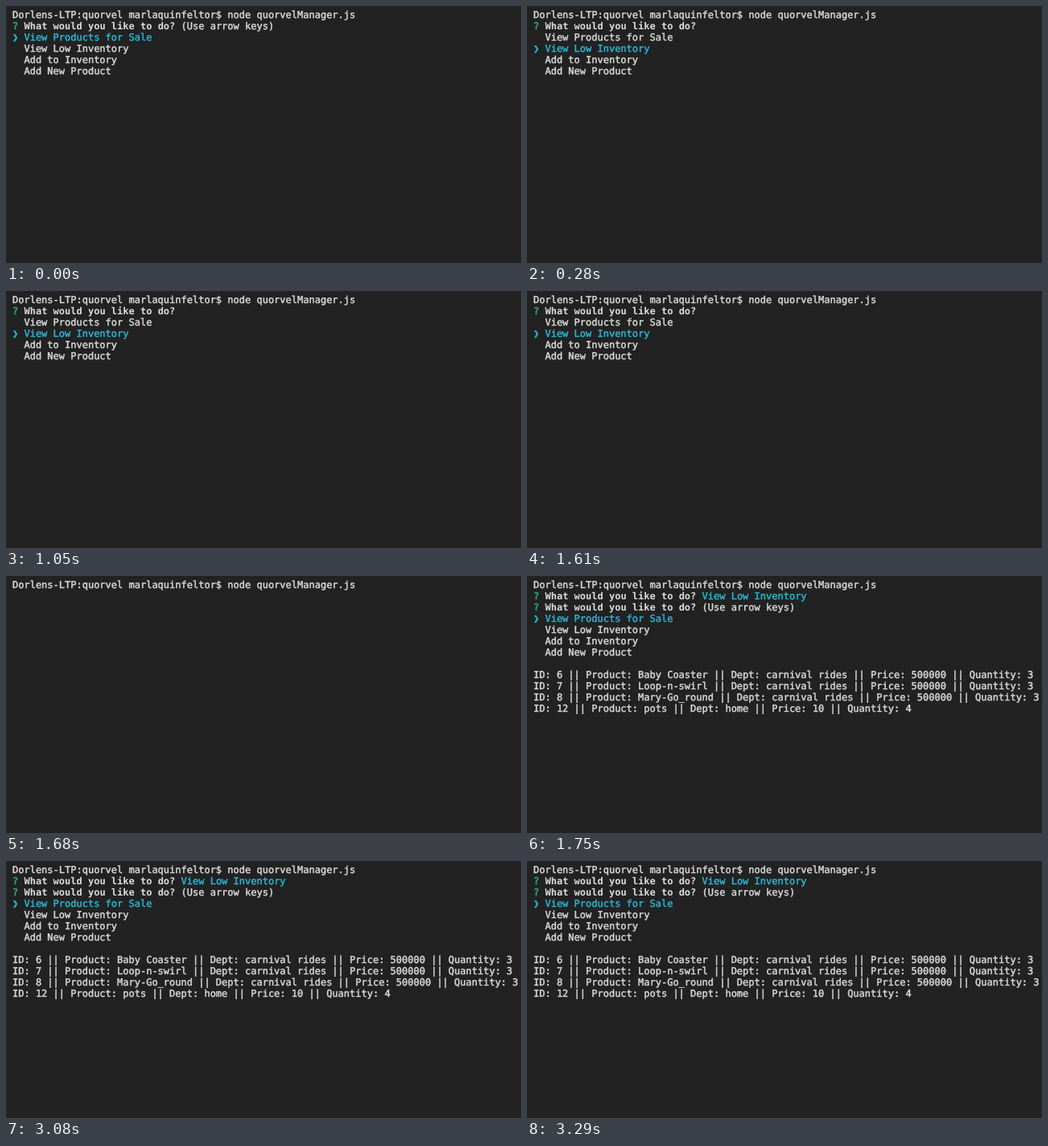
An HTML page that plays this animation: 640x320 px, repeating every 3.36 s.

```html
<!DOCTYPE html>
<html lang="en">
<head>
<meta charset="utf-8">
<title>Inventory prompt</title>
<style>
  html, body { margin: 0; width: 100%; height: 100%; overflow: hidden; background: #222; }
  pre {
    position: absolute; left: 8px; top: 4px; margin: 0;
    font: 12px/14px "DejaVu Sans Mono", monospace;
    font-variant-ligatures: none;
    text-rendering: geometricPrecision;
    color: #d8d8d8;
    -webkit-text-stroke: .45px currentColor;
  }
  b { color: #dcdcdc; -webkit-text-stroke-width: 0; }
  i { font-style: normal; color: #2ab5d2; }
  u { text-decoration: none; color: #27b48c; }
</style>
</head>
<body>
<script>
const LOOP = 3360;
const COMMAND = 'Dorlens-LTP:quorvel marlaquinfeltor$ node quorvelManager.js';
const CHOICES = ['View Products for Sale', 'View Low Inventory', 'Add to Inventory', 'Add New Product'];
const HINT = '(Use arrow keys)';

const question = tail => `<u>?</u> <b>What would you like to do?</b> ${tail}`;
const menu = selected => CHOICES.map((c, i) => i === selected ? `<i>❯ ${c}</i>` : `  ${c}`);
const item = (id, name, dept, price, count) =>
  `ID: ${id} || Product: ${name} || Dept: ${dept} || Price: ${price} || Quantity: ${count}`;

// Each screen: start time in ms, then the lines below the command
const screens = [
  [0, question(HINT), ...menu(0)],
  [280, question(''), ...menu(1)],
  [1680],
  [1750,
    question(`<i>${CHOICES[1]}</i>`),
    question(HINT), ...menu(0), '',
    item(6, 'Baby Coaster', 'carnival rides', 500000, 3),
    item(7, 'Loop-n-swirl', 'carnival rides', 500000, 3),
    item(8, 'Mary-Go_round', 'carnival rides', 500000, 3),
    item(12, 'pots', 'home', 10, 4)]
];

const views = screens.map(([start, ...lines]) => {
  const el = document.createElement('pre');
  el.innerHTML = [COMMAND, ...lines].join('\n');
  document.body.append(el);
  return { start, el };
});

const origin = performance.now();

function draw(now) {
  const t = Math.max(0, now - origin) % LOOP;
  const current = views.filter(v => v.start <= t).pop();
  for (const v of views) v.el.style.visibility = v === current ? 'visible' : 'hidden';
  requestAnimationFrame(draw);
}
draw(origin);
</script>
</body>
</html>
```
